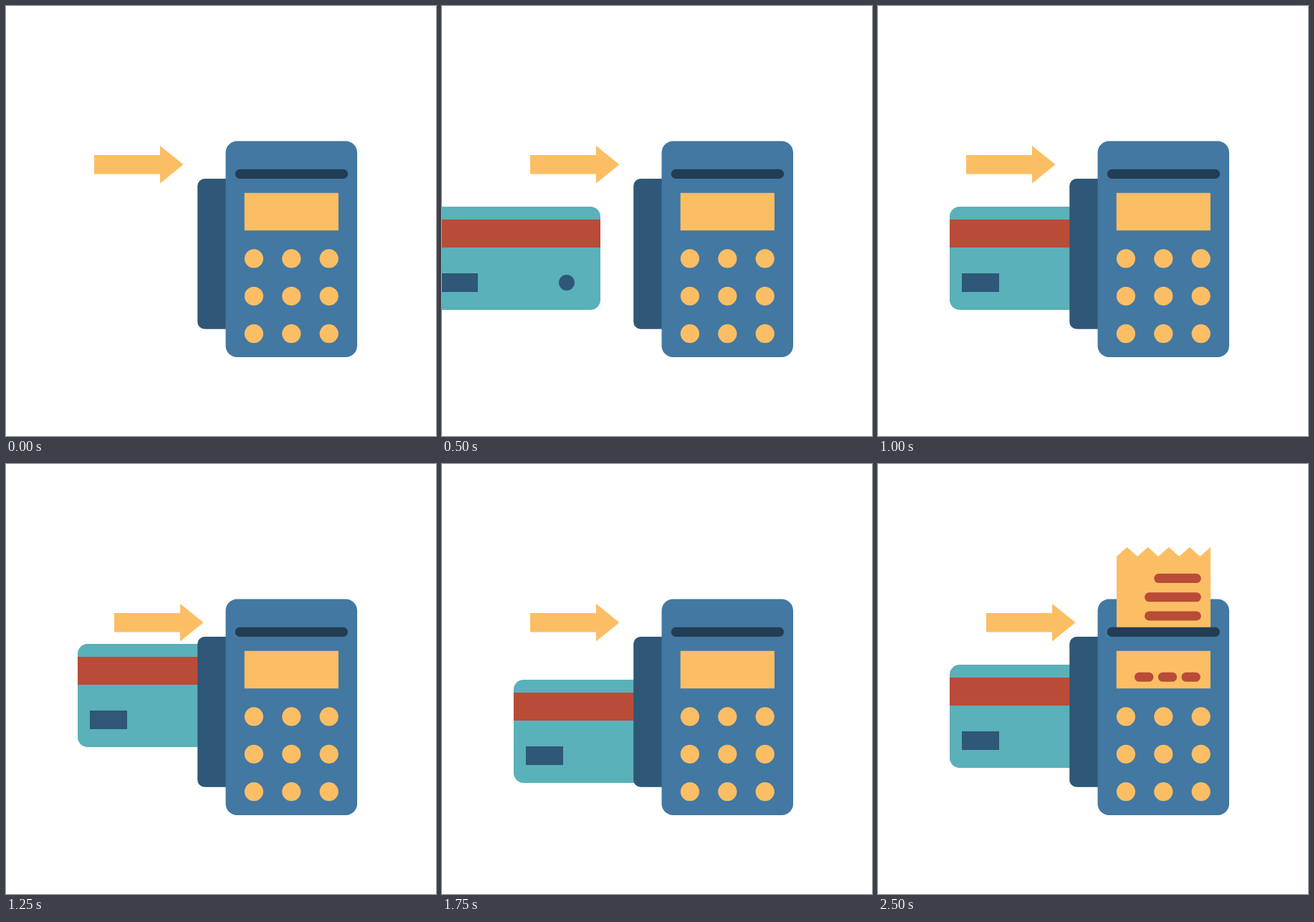
Animation of 600x600 px, one loop 2.9 s. Source, as an HTML page:

```html
<!DOCTYPE html>
<html lang="en">
<head>
<meta charset="utf-8">
<title>Card payment</title>
<style>
  html, body { margin: 0; width: 100%; height: 100%; overflow: hidden; background: #fff; }
  svg { display: block; width: 100%; height: 100%; }
  .yellow { fill: #fcbe64; }
  .red { fill: #b84c38; }
  .navy { fill: #2f5777; }
  #sparks { stroke-width: 4; stroke-linecap: round; }
</style>
</head>
<body>
<svg viewBox="0 0 600 600">
  <defs>
    <clipPath id="above"><rect x="300" width="200" height="234"/></clipPath>
  </defs>

  <g id="card">
    <rect width="240" height="144" rx="14" fill="#5ab1b9"/>
    <rect class="red" y="18" width="240" height="39"/>
    <rect class="navy" x="17" y="93" width="52" height="26"/>
    <circle class="navy" cx="193" cy="106" r="11"/>
  </g>

  <path id="arrow" class="yellow" d="M0 208.1H92V195L124.5 221.2L92 247.4V234.4H0Z"/>

  <rect class="navy" x="267.2" y="241" width="60" height="209.7" rx="10"/>
  <rect x="306.5" y="188.6" width="183.5" height="301.4" rx="16" fill="#4278a2"/>
  <rect class="yellow" x="332.7" y="260.8" width="131.2" height="52.4"/>
  <g id="keys" class="yellow"></g>

  <g clip-path="url(#above)">
    <g id="receipt">
      <path id="paper" class="yellow"/>
      <g id="printed" class="red"></g>
    </g>
  </g>
  <rect x="319.7" y="227.8" width="157.4" height="13.2" rx="6.6" fill="#223d54"/>
  <g id="screen" class="red"></g>

  <g id="sparks">
    <path stroke="#fcbe64" pathLength="1" d="M325 140.5L335 155.5"/>
    <path stroke="#b84c38" pathLength="1" d="M402 138V151"/>
    <path stroke="#4278a2" pathLength="1" d="M474.8 138.8L467.4 153.2"/>
  </g>
</svg>

<script>
const LOOP = 2900, STEP = 250;
const HIDDEN = -300;
const $ = id => document.getElementById(id);

const bar = (x, y, w) => `<rect x="${x}" y="${y}" width="${w}" height="13.1" rx="6.55"/>`;
const shortLine = y => bar(385.2, y, 65.6);
const longLine = y => bar(372, y, 78.8);
const place = (id, x, y) => $(id).setAttribute("transform", `translate(${x} ${y})`);

// Arrow x, card x, card y
const poses = [
  [123, HIDDEN, 280],
  [151, -51, 280],
  [123, -19, 280],
  [151, 12, 280],
  [123, 100, 280],
  [151, 100, 251],
  [151, 100, 280],
  [123, 100, 301],
  [151, 100, 301],
  [123, 100, 301],
  [151, 100, 280]
];

// Printing phase: paper top, spark length, screen content
const printing = {
  8: { top: 222, spark: 0.4, screen: shortLine(293.7) },
  9: { top: 169, spark: 1, screen: longLine(265.3) + longLine(291.6) },
  10: { top: 116, spark: 0, screen: [358, 390.8, 423.5].map(x => bar(x, 290.7, 26.3)).join("") }
};
const idle = { top: 300, spark: 0, screen: "" };

for (let i = 0; i < 9; i++) {
  const x = 345.9 + (i % 3) * 52.4, y = 352.4 + Math.floor(i / 3) * 52.4;
  $("keys").innerHTML += `<circle cx="${x}" cy="${y}" r="13.1"/>`;
}

let edge = "M332.9 140V13";
for (let i = 1; i <= 9; i++) edge += `L${332.9 + i * 14.57} ${i % 2 ? 0 : 13}`;
$("paper").setAttribute("d", edge + "V140Z");
$("printed").innerHTML = shortLine(37) + longLine(63.2) + longLine(89.4);

let shown = -1;
function draw(step) {
  if (step === shown) return;
  shown = step;
  const [arrowX, cardX, cardY] = poses[step];
  const { top, spark, screen } = printing[step] || idle;
  place("arrow", arrowX, 0);
  place("card", cardX, cardY);
  place("receipt", 0, top);
  $("screen").innerHTML = screen;
  $("sparks").style.display = spark ? "" : "none";
  $("sparks").style.strokeDasharray = spark < 1 ? `${spark} 3` : "none";
}

const start = performance.now();
function tick() {
  const t = (performance.now() - start) % LOOP;
  draw(Math.min(poses.length - 1, Math.floor(t / STEP)));
  requestAnimationFrame(tick);
}
tick();
</script>
</body>
</html>
```
